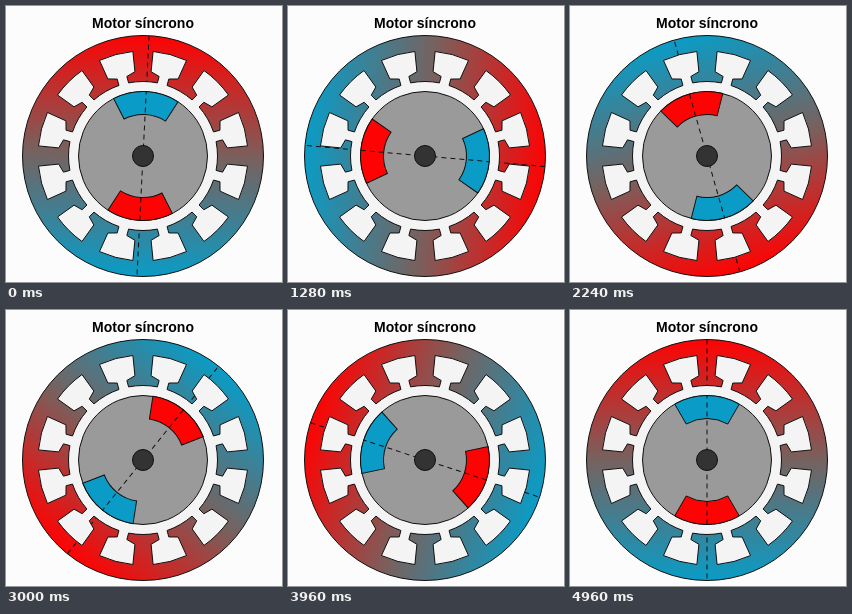
Animation of 276x276 px, one loop 5 s. Source, as an HTML page with a canvas:

```html
<!DOCTYPE html>
<html lang="es">
<head>
<meta charset="utf-8">
<title>Motor síncrono</title>
<style>
  html, body { margin: 0; width: 100%; height: 100%; overflow: hidden; background: #fcfcfc; }
  canvas { display: block; }
</style>
</head>
<body>
<canvas id="stage" width="276" height="276"></canvas>
<script>
const ctx = document.getElementById('stage').getContext('2d');
const PERIOD = 5000, STEP = 40, TAU = Math.PI * 2;
const RED = '#fe0303', BLUE = '#0a9cc6', MIXED = '#76625f', WHITE = '#f4f4f4', INK = '#101010';
const OUTER = 120.5, BORE = 74.5, ROTOR = 64.5, POLE_INNER = 41.5, SHAFT = 10.5;

function paint(path, fill) {
  ctx.fillStyle = fill;
  ctx.fill(path);
  ctx.stroke(path);
}

function disc(radius) {
  const path = new Path2D();
  path.arc(0, 0, radius, 0, TAU);
  return path;
}

// Angles are clockwise from the top.
function rotated(angle, draw) {
  ctx.save();
  ctx.rotate(angle);
  draw();
  ctx.restore();
}

// Bore and the twelve T-shaped slots as one outline.
function makeCavity() {
  const path = new Path2D();
  const mouth = Math.asin(5 / BORE), top = Math.asin(17.3 / 105);
  for (let i = 0; i < 12; i++) {
    const a = (i + 0.5) * TAU / 12, up = a - TAU / 4;
    const corner = (x, r) => path.lineTo(
      x * Math.cos(a) + r * Math.sin(a), x * Math.sin(a) - r * Math.cos(a));
    path.arc(0, 0, BORE, up - TAU / 24, up - mouth);
    corner(-5, 81);
    corner(-14, 83.5);
    path.arc(0, 0, 105, up - top, up + top);
    corner(14, 83.5);
    corner(5, 81);
    path.arc(0, 0, BORE, up + mouth, up + TAU / 24);
  }
  path.closePath();
  return path;
}

function makePole() {
  const path = new Path2D(), half = TAU / 12, up = -TAU / 4;
  path.arc(0, 0, ROTOR, up - half, up + half);
  path.arc(0, 0, POLE_INNER, up + half, up - half, true);
  path.closePath();
  return path;
}

const cavity = makeCavity(), pole = makePole();

function drawAxis(radius) {
  ctx.setLineDash([5, 4]);
  ctx.lineDashOffset = OUTER - radius;
  ctx.beginPath();
  ctx.moveTo(0, -radius);
  ctx.lineTo(0, radius);
  ctx.stroke();
  ctx.setLineDash([]);
}

function drawStator(angle) {
  const dx = Math.sin(angle) * OUTER, dy = -Math.cos(angle) * OUTER;
  const field = ctx.createLinearGradient(dx, dy, -dx, -dy);
  [RED, MIXED, BLUE].forEach((color, i) => field.addColorStop(i / 2, color));
  paint(disc(OUTER), field);
  rotated(angle, () => drawAxis(OUTER));
  paint(cavity, WHITE);
}

function drawRotor(angle) {
  paint(disc(ROTOR), '#9a9a9a');
  rotated(angle, () => paint(pole, BLUE));
  rotated(angle + Math.PI, () => paint(pole, RED));
  rotated(angle, () => drawAxis(ROTOR));
  paint(disc(SHAFT), '#333');
}

function render(time) {
  const ticks = Math.floor(time % PERIOD / STEP);
  const angle = (ticks + 1) * STEP / PERIOD * TAU;
  ctx.fillStyle = '#fcfcfc';
  ctx.fillRect(0, 0, 276, 276);
  ctx.fillStyle = '#000';
  ctx.font = 'bold 14px "Liberation Sans", Arial, sans-serif';
  ctx.textAlign = 'center';
  ctx.fillText('Motor síncrono', 137, 22);

  ctx.save();
  ctx.translate(137, 150);
  ctx.strokeStyle = INK;
  ctx.lineWidth = 1;
  drawStator(angle);
  drawRotor(angle);
  ctx.restore();
}

const start = performance.now();
function loop() {
  render(performance.now() - start);
  requestAnimationFrame(loop);
}
loop();
</script>
</body>
</html>
```
